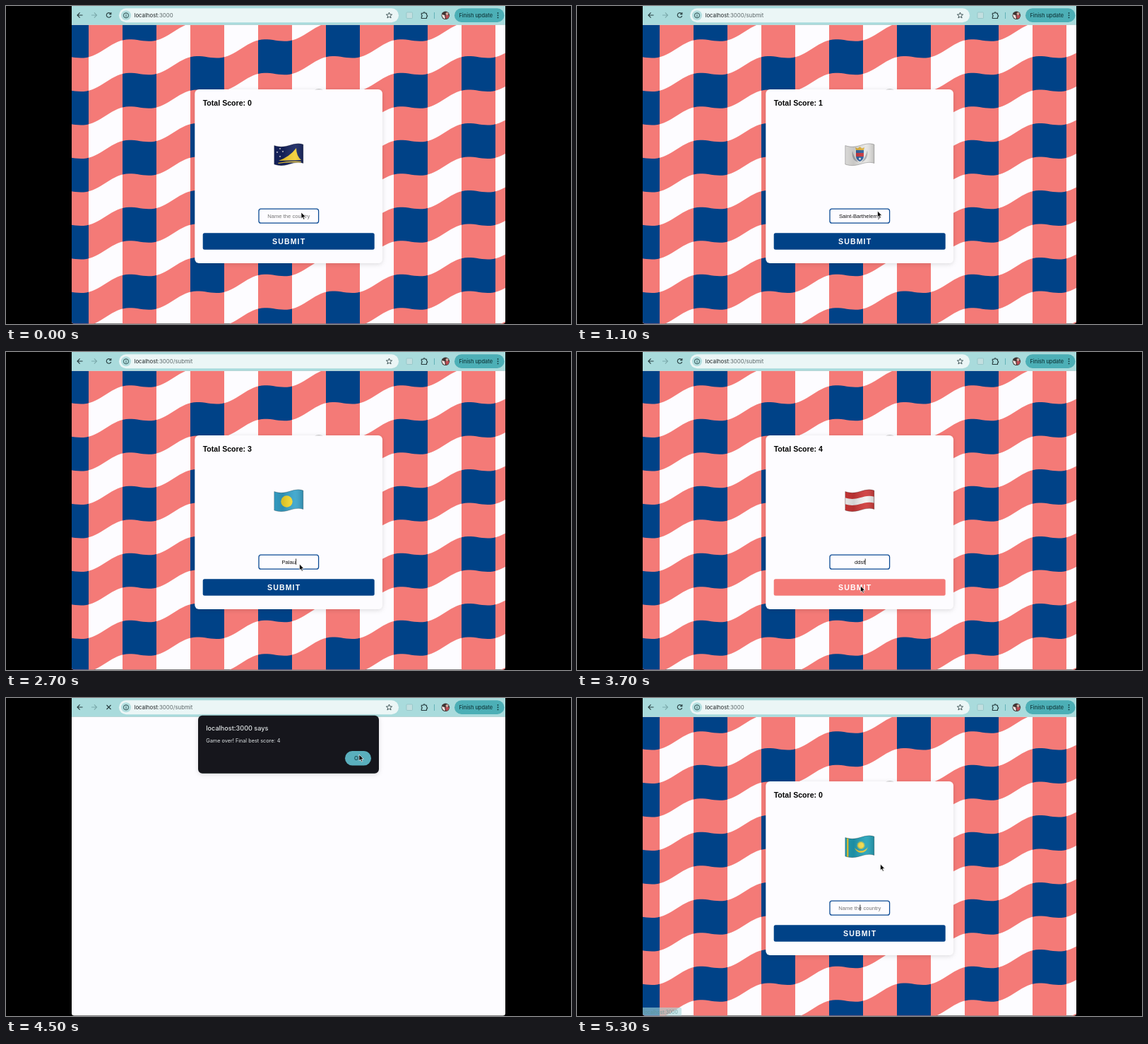
An HTML page for the animation above (5400 ms loop, 800 by 450 pixels).

```html
<!DOCTYPE html>
<html lang="en">
<head>
<meta charset="utf-8">
<title>Flag quiz</title>
<style>
html, body { margin: 0; width: 100%; height: 100%; overflow: hidden; background: #000; }
svg { display: block; width: 800px; height: 450px; }
text { font-family: Inter, Roboto, sans-serif; white-space: pre; }
.page text { font-family: "Liberation Sans", Arial, sans-serif; }
</style>
</head>
<body>
<svg viewBox="0 0 800 450">
  <defs>
    <clipPath id="view"><path d="M93 26.5H707V446Q707 449.5 703.500 449.500H96.500Q93 449.500 93 446Z"/></clipPath>
    <clipPath id="bands"><path id="bandClip"/></clipPath>
    <clipPath id="cloth"><path id="clothPath"/></clipPath>
    <linearGradient id="fold">
      <stop offset="0" stop-color="#000" stop-opacity=".05"/>
      <stop offset=".3" stop-color="#000" stop-opacity=".13"/>
      <stop offset=".7" stop-color="#fff" stop-opacity=".08"/>
      <stop offset="1" stop-color="#000" stop-opacity=".2"/>
    </linearGradient>
    <filter id="soft" x="-20%" y="-20%" width="140%" height="150%">
      <feDropShadow dx="0" dy="1.500" stdDeviation="3" flood-opacity=".13"/>
    </filter>
  </defs>
  <rect width="800" height="450"/>
  <g clip-path="url(#view)">
    <rect x="93" y="26" width="614" height="424" fill="#fdfcff"/>
    <g id="page" class="page">
      <path id="redCols" fill="#f47a77"/>
      <path id="redBands" fill="#f47a77"/>
      <path id="blueCols" fill="#004287" clip-path="url(#bands)"/>
      <rect x="267.300" y="118" width="265.700" height="246" rx="6" fill="#fdfcff" filter="url(#soft)"/>
      <path d="M437 118.200q6-1.400 12 0z" fill="#999"/>
      <text id="score" x="278.700" y="141.300" font-size="10.600" font-weight="700"></text>
      <g clip-path="url(#cloth)">
        <g id="flag"></g>
        <rect x="379" y="194" width="43" height="34" fill="url(#fold)"/>
      </g>
      <use href="#clothPath" fill="none" stroke="#000" stroke-opacity=".3" stroke-width=".8"/>
      <rect x="358" y="287.200" width="84.600" height="20" rx="3" fill="#fdfcff" stroke="#0b4a94" stroke-width="1.300"/>
      <text id="word" x="400.300" y="299.500" font-size="7.650" text-anchor="middle"></text>
      <rect id="caret" y="292.500" width=".8" height="8.500"/>
      <rect id="button" x="278.700" y="321.300" width="243" height="23.500" rx="2.500"/>
      <text id="label" y="336.700" font-size="10.600" font-weight="700" letter-spacing="1.100" fill="#fff">SUBMIT</text>
    </g>
    <g id="status">
      <path d="M93 438h53q2 0 2 2v10H93z" fill="#a9dbdc" opacity=".6"/>
      <text x="94" y="447" font-size="6.900" fill="#5d9496" opacity=".8">localhost:3000</text>
    </g>
  </g>
  <rect x="93" width="614" height="26.500" fill="#a9dbdc"/>
  <path d="M93 26.500h614" stroke="#c9e9e9" stroke-width=".7"/>
  <g fill="none" stroke="#263c3e" stroke-width="1.100">
    <path d="M108.500 13h-7.500m3.600-3.600L101 13l3.600 3.600"/>
    <path d="M121 13h7.500m-3.600-3.600l3.600 3.600-3.600 3.600" stroke="#7ba9ab"/>
    <path id="reload" d="M148 10.700A3.300 3.300 0 1 0 148.700 14M148.800 9v2.600h-2.600"/>
    <path id="stop" d="M142.500 10l6 6m0-6l-6 6"/>
  </g>
  <rect x="160" y="3.300" width="396" height="20" rx="10" fill="#ebf6f6"/>
  <circle cx="170" cy="13.300" r="7" fill="#b4dfe0"/>
  <circle cx="170" cy="13.300" r="3.600" fill="none" stroke="#315456"/>
  <path d="M170 12.800v2.500m0-4.300v.9" stroke="#315456"/>
  <text x="181.500" y="16" font-size="7.800" fill="#1f2527">localhost<tspan id="path" fill="#5b6668"></tspan></text>
  <path id="star" fill="none" stroke="#33484a" stroke-width=".9" stroke-linejoin="round"/>
  <rect x="567" y="9" width="8.500" height="8.500" rx="1" fill="#c2dfe0" stroke="#8fbfc1" stroke-width=".7"/>
  <path d="M588.300 10.200h2.500a1.300 1.300 0 0 1 2.600 0h2.100v2.500a1.300 1.300 0 0 1 0 2.600v2.200h-7.200v-2.400a1.300 1.300 0 0 0 0-2.500z" fill="none" stroke="#263c3e" stroke-width="1.100"/>
  <path d="M606.500 9v9" stroke="#64b3b9"/>
  <circle cx="622.300" cy="13.300" r="5.800" fill="#3e3432"/>
  <path d="M617 12l4 1 1 5q-4 0-5-6z" fill="#f1dfdc"/>
  <path d="M622 13h5.500q0 4-4 5.500z" fill="#bd4d55"/>
  <circle cx="624.500" cy="11" r="2" fill="#d5aaa0"/>
  <rect x="635" y="3.300" width="70.500" height="19.700" rx="9.850" fill="#4cafb6"/>
  <text x="641.500" y="16" font-size="7.400" font-weight="500" fill="#123a3e">Finish update</text>
  <g fill="#123a3e"><circle cx="696.500" cy="10" r=".9"/><circle cx="696.500" cy="13.200" r=".9"/><circle cx="696.500" cy="16.400" r=".9"/></g>
  <g id="alert">
    <rect x="272" y="24.800" width="256" height="82" rx="6" fill="#14191b" filter="url(#soft)"/>
    <text x="283.300" y="46.300" font-size="9.100" font-weight="500" fill="#e3e8e9">localhost:3000 says</text>
    <text x="283.300" y="63" font-size="7.300" fill="#dfe4e5">Game over! Final best score: 4</text>
    <rect x="480" y="75" width="37" height="20.500" rx="10.250" fill="#5aafbd"/>
    <text x="498.500" y="88" font-size="7.600" font-weight="500" text-anchor="middle" fill="#123a44">OK</text>
  </g>
  <path id="cursor" d="M0 0V8.800L2 7 3.400 10.200 4.900 9.500 3.500 6.400H6.300Z" stroke="#fff" stroke-width=".7"/>
</svg>
<script>
const $ = id => document.getElementById(id);
const LOOP = 5400, STEP = 100, COL = 48, ROW = 47.5;

// Gingham backdrop: bands climb to the right, one ripple per pair of columns
const wave = x => 6 * Math.sin((x - 189) * Math.PI / COL) - (x - 189) * ROW / (4 * COL);
function edge(y, reverse) {
  const pts = [];
  for (let x = 90; x <= 710; x += 4) pts.push(x + ' ' + (y + wave(x)).toFixed(2));
  return (reverse ? pts.reverse() : pts).join('L');
}
let cols = '', bands = '';
for (let x = 69; x < 707; x += 2 * COL) cols += `M${x} 20h${COL}v440h-${COL}z`;
for (let y = 96 - 4 * ROW; y < 620; y += 2 * ROW) bands += `M${edge(y)}L${edge(y + ROW, true)}Z`;
$('redCols').setAttribute('d', cols);
$('blueCols').setAttribute('d', cols);
$('redBands').setAttribute('d', bands);
$('bandClip').setAttribute('d', bands);

function star(cx, cy, r, inner, n) {
  let d = '';
  for (let i = 0; i < 2 * n; i++) {
    const a = i * Math.PI / n - Math.PI / 2, q = i % 2 ? inner : r;
    d += (i ? 'L' : 'M') + (cx + q * Math.cos(a)).toFixed(2) + ' ' + (cy + q * Math.sin(a)).toFixed(2);
  }
  return d + 'Z';
}
$('star').setAttribute('d', star(542.5, 13.4, 4.4, 1.9, 5));

// Flags
const ribbon = (y, h) => `M379.800 ${y}c7.500 2.500 13.500 2 20.500 0s13.500-4 20.500-1.500v${h}c-7-2.500-13.500-.5-20.500 1.500s-13 2.500-20.500 0z`;
const box = (x, y, w, h, c) => `<rect x="${x}" y="${y}" width="${w}" height="${h}" fill="${c}"/>`;
const shape = (d, c) => `<path d="${d}" fill="${c}"/>`;
const dot = (x, y, r, c) => `<circle cx="${x}" cy="${y}" r="${r}" fill="${c}"/>`;
const field = c => box(379, 193, 43, 36, c);
$('clothPath').setAttribute('d', ribbon(197.5, 26.5));
const flags = {
  Tokelau: field('#15235f') +
    shape('M386 219Q402 213 411 201Q411 212 418 218Z', '#f6cf32') +
    shape('M385 222Q400 219 418 220L417 222Q400 220 386 223Z', '#f6cf32') +
    [[388, 202], [384, 207], [392, 206], [388, 213]].map(p => shape(star(...p, 1.5, .6, 5), '#fff')).join(''),
  'Saint-Barthelemy': field('#e6e5e3') +
    shape('M390 205Q388 218 398 221Q392 214 390 205M411 204Q413 217 403 221Q409 213 411 204', '#a9adb2') +
    shape('M395 204H406V212Q406 218 400.500 220Q395 218 395 212Z', '#2d5f9e') +
    box(395, 208, 11, 5, '#c9343c') + dot(400.5, 216, 1.5, '#e9e9ee') +
    shape('M395 204L394 200L397.500 201.500L400.500 199L403.500 201.500L407 200L406 204Z', '#dfb23c'),
  Zambia: field('#2b8a22') + box(407, 204, 4.4, 25, '#d03a31') + box(411.4, 204, 4.4, 25, '#161616') +
    box(415.8, 204, 5.5, 25, '#ea7a35') + shape('M407 199L413 201L419 198.500L416 203L413 202L410 203Z', '#e2762e'),
  Palau: field('#36a3cb') + dot(397.5, 211.5, 8.2, '#f8dc2d'),
  Austria: field('#ce3838') + shape(ribbon(206.3, 9), '#f2f1f1'),
  Kazakhstan: field('#21a1b9') + box(382, 196, 2.5, 32, '#d9c43c') +
    shape(star(402, 208.5, 6.4, 4, 16), '#f2d435') + dot(402, 208.5, 3.3, '#f7df50') +
    shape('M393 212Q398 217 402 216Q407 217 412 211Q409 219 402 219Q396 219 393 212Z', '#e5c836')
};

// start step, score, flag, first and last typing step, typed text
const scenes = [
  [0, 0, 'Tokelau', 1, 4, 'Tokelau'],
  [8, 1, 'Saint-Barthelemy', 9, 11, 'Saint-Barthelemy'],
  [15, 2, 'Zambia', 19, 21, 'Zambia'],
  [24, 3, 'Palau', 25, 27, 'Palau'],
  [32, 4, 'Austria', 33, 35, 'ddsf'],
  [39],
  [47, 0, 'Kazakhstan', 99, 99, '']
];

// step, x, y
const moves = [
  [0, 418, 292], [4, 418, 292], [6, 405, 331], [7, 405, 331], [9, 425.5, 290], [11, 425.5, 290],
  [13, 404, 331], [14, 404, 331], [16, 409, 295], [21, 409, 295], [22, 404, 331], [23, 404, 331],
  [25, 415.5, 300], [28, 415.5, 300], [30, 402, 331], [31, 402, 331], [33, 412, 300], [35, 412, 300],
  [36, 401.5, 331], [38, 401.5, 331], [41, 480, 110], [43, 500, 80], [46, 500, 80], [53, 429.5, 235]
];

function pointer(s) {
  let i = 0;
  while (i < moves.length - 2 && s > moves[i + 1][0]) i++;
  const [a, ax, ay] = moves[i], [b, bx, by] = moves[i + 1];
  const k = Math.min(1, (s - a) / (b - a)), e = k * k * (3 - 2 * k);
  return [ax + (bx - ax) * e, ay + (by - ay) * e];
}

const show = (id, on) => $(id).setAttribute('display', on ? 'inline' : 'none');
let last = -1, shownFlag;

function draw(s) {
  const [start, score, flag, from, to, answer] = scenes.filter(v => v[0] <= s).pop();
  const over = flag === undefined, home = start === 0 || start === 47;
  const [x, y] = pointer(s);
  show('page', !over);
  show('alert', over);
  show('stop', over);
  show('reload', !over);
  show('status', s >= 50);
  $('path').textContent = home ? ':3000' : ':3000/submit';
  $('cursor').setAttribute('transform', `translate(${x} ${y})`);
  if (over) return;
  if (flag !== shownFlag) $('flag').innerHTML = flags[shownFlag = flag];
  $('score').textContent = 'Total Score: ' + score;
  const part = Math.max(0, Math.min(1, (s - from + 1) / (to - from + 1)));
  const typed = answer.slice(0, Math.round(answer.length * part));
  const word = $('word');
  word.textContent = typed || 'Name the country';
  word.setAttribute('fill', typed ? '#111' : '#757575');
  $('caret').setAttribute('x', 400.5 + (typed ? word.getComputedTextLength() / 2 : 0));
  const hover = x > 279 && x < 522 && y > 321 && y < 345;
  show('caret', s % 10 > 2);
  $('button').setAttribute('fill', hover ? '#f47a77' : '#004287');
  $('label').setAttribute('x', home ? 377 : 370);
}

const origin = performance.now();
function tick() {
  const s = Math.floor((performance.now() - origin) % LOOP / STEP);
  if (s !== last) draw(last = s);
  requestAnimationFrame(tick);
}
tick();
</script>
</body>
</html>
```
